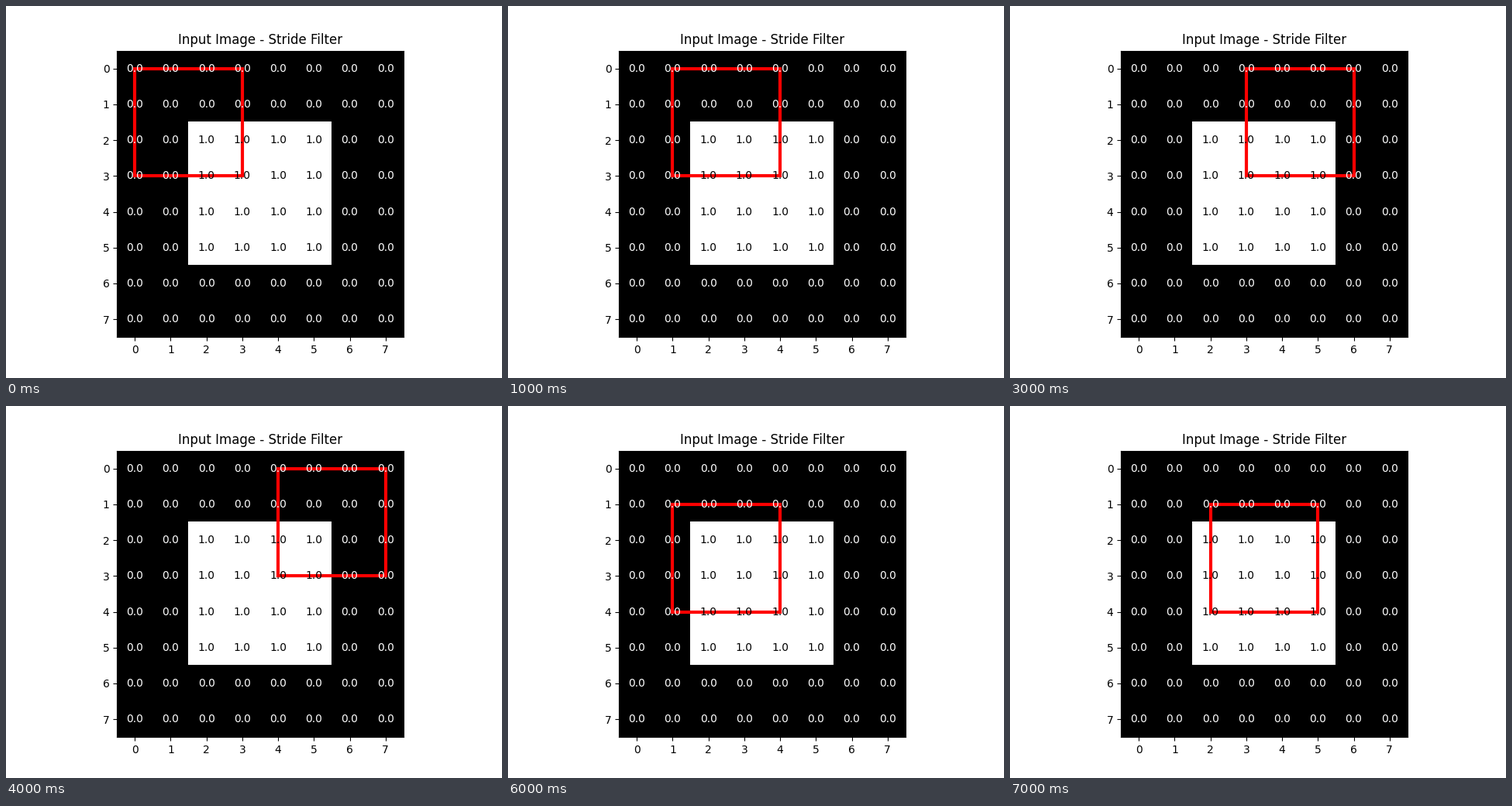
A matplotlib script for the animation above (8000 ms loop, 640x480 px).

```python
import matplotlib.pyplot as plt
import numpy as np
from matplotlib.animation import FuncAnimation
from matplotlib.patches import Rectangle

SIZE = 8        # image is SIZE x SIZE cells
SPAN = 3        # side of the filter outline, in cells
COLUMNS = 5     # filter positions per row
STEPS = 8       # positions shown in one loop

plt.rcParams["font.family"] = "DejaVu Sans"

image = np.zeros((SIZE, SIZE))
image[2:6, 2:6] = 1

fig, ax = plt.subplots(figsize=(6.4, 4.8), dpi=100)
ax.imshow(image, cmap="gray")
ax.set_title("Input Image - Stride Filter")
ax.set_xticks(range(SIZE))
ax.set_yticks(range(SIZE))

for (row, col), value in np.ndenumerate(image):
    ax.text(col, row, f"{value:.1f}", ha="center", va="center",
            color="black" if value else "white")

window = ax.add_patch(Rectangle((0, 0), SPAN, SPAN, linewidth=3,
                                edgecolor="red", facecolor="none"))


def update(step):
    row, col = divmod(step, COLUMNS)
    window.set_xy((col, row))
    return (window,)


anim = FuncAnimation(fig, update, frames=STEPS, interval=1000,
                     repeat=True, repeat_delay=0)
plt.show()
```
